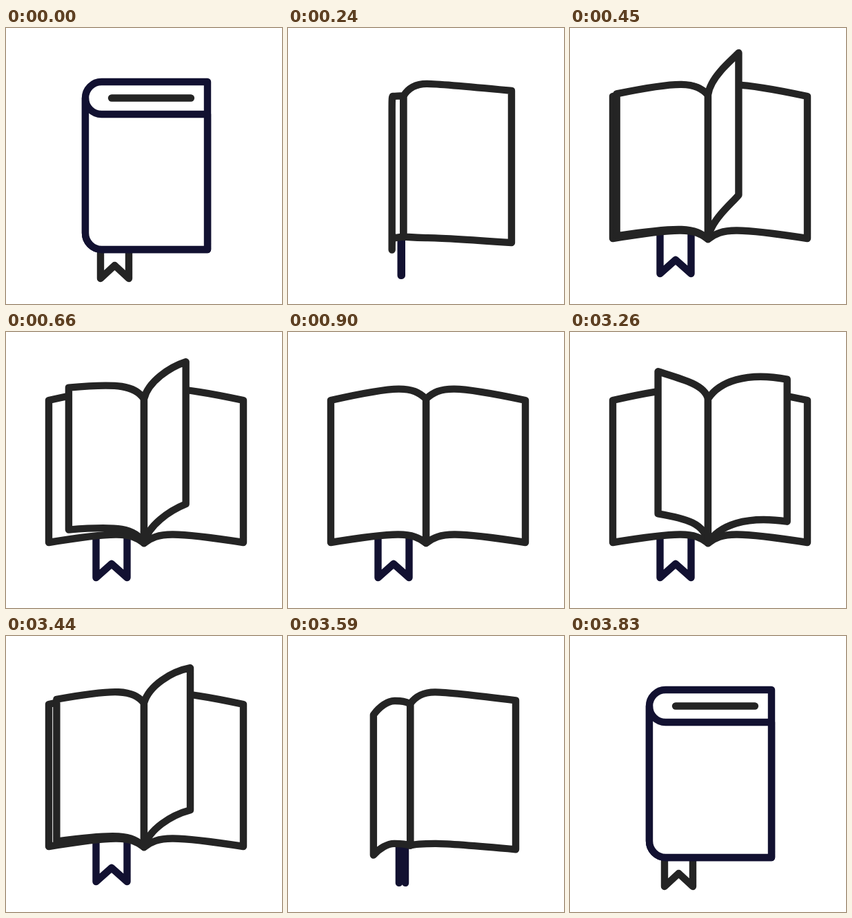
Write an HTML page with a canvas that moves like this. It is 400 px wide and 400 px high and loops after 4860 ms.

```html
<!DOCTYPE html>
<html lang="en">
<head>
<meta charset="utf-8">
<title>Book</title>
<style>
html, body { margin: 0; width: 100%; height: 100%; overflow: hidden; background: #fff; }
canvas { display: block; width: 100vmin; height: 100vmin; }
</style>
</head>
<body>
<canvas id="stage" width="400" height="400"></canvas>
<script>
const ctx = document.getElementById('stage').getContext('2d');
const GRAY = '#242424', NAVY = '#121131';
const LOOP = 4860, STEP = 30, OPENED = 900, CLOSE_AT = 2960;
const EDGE_ON = 0.438; // cover is seen edge-on

const clamp = (v, a = 0, b = 1) => Math.min(b, Math.max(a, v));
const lerp = (a, b, k) => a + (b - a) * k;
const smooth = v => { v = clamp(v); return v * v * (3 - 2 * v); };
const mix = (a, b, k) => a.map((v, i) => lerp(v, b[i], k));
const mixAll = (a, b, k) => a.map((pt, i) => mix(pt, b[i], k));

// One cubic as two joined cubics (7 points), so that it can morph to arc + line
function split(a, b, c, d) {
  const ab = mix(a, b, .5), bc = mix(b, c, .5), cd = mix(c, d, .5);
  const abc = mix(ab, bc, .5), bcd = mix(bc, cd, .5);
  return [a, ab, abc, mix(abc, bcd, .5), bcd, cd, d];
}

// Leaf poses while turning: edge x, edge y, two control points, their drop to the lower side
const POSES = [
  [344, 99, 221, 78, 240, 77, 212],
  [314, 68, 216, 72, 255, 57, 208],
  [245, 36, 203, 72, 232, 49, 208],
  [200, 38, 200, 75, 197, 55, 204],
  [128, 57, 196, 77, 168, 70, 200],
  [62, 99, 180, 78, 160, 77, 212]
];

// Open leaf whose outer edge stands at x
function leafAt(x) {
  let i = 0;
  while (i < POSES.length - 2 && x < POSES[i + 1][0]) i++;
  const a = POSES[i], b = POSES[i + 1];
  const [ex, ey, ax, ay, bx, by, drop] = mix(a, b, clamp((a[0] - x) / (a[0] - b[0])));
  return {
    top: split([200, 97], [ax, ay], [bx, by], [ex, ey]),
    low: split([200, 306], [ax, ay + drop], [bx, by + drop], [ex, ey + 206])
  };
}

// Edge of the closed book: quarter round at the spine, then straight
function closedEdge(from, to) {
  const k = (to - from) * .55;
  return [[115, from], [115, from + k], [125.5, to], [138.5, to], [155, to], [192, to], [292, to]];
}

const RIGHT = leafAt(344), LEFT = leafAt(62);
const BACK = { top: closedEdge(101.5, 78), low: closedEdge(297, 321) };
const COVER = { top: closedEdge(101.5, 125), low: closedEdge(297, 321) };

const morph = (a, b, k) => ({ top: mixAll(a.top, b.top, k), low: mixAll(a.low, b.low, k) });

function coverLeaf(p) {
  const leaf = morph(LEFT, COVER, p), sag = 11 * Math.sin(Math.PI * p);
  for (const side of [leaf.top, leaf.low]) {
    const [near, far] = [side[0][0], side[6][0]].sort((a, b) => a - b);
    for (const pt of side) pt[0] = clamp(pt[0], near, far);
    side[5][1] += sag / 2;
    side[6][1] += sag;
  }
  return leaf;
}

// Carry a turning page along with the leaf it belongs to
function carry(page, rest, now) {
  const move = s => page[s].map((pt, i) => pt.map((v, j) => v + now[s][i][j] - rest[s][i][j]));
  return { top: move('top'), low: move('low') };
}

function drawLeaf({ top, low }, color) {
  const r = [...low].reverse();
  ctx.beginPath();
  ctx.moveTo(...top[0]);
  ctx.bezierCurveTo(...top[1], ...top[2], ...top[3]);
  ctx.bezierCurveTo(...top[4], ...top[5], ...top[6]);
  ctx.lineTo(...r[0]);
  ctx.bezierCurveTo(...r[1], ...r[2], ...r[3]);
  ctx.bezierCurveTo(...r[4], ...r[5], ...r[6]);
  ctx.closePath();
  ctx.fillStyle = '#fff';
  ctx.fill();
  ctx.strokeStyle = color;
  ctx.stroke();
}

function drawLine(pts, color) {
  ctx.beginPath();
  pts.forEach(pt => ctx.lineTo(...pt));
  ctx.strokeStyle = color;
  ctx.stroke();
}

function drawRibbon(p) {
  const [a, b] = p < .27
    ? mix([130.5, 175.5], [161, 170], p / .27)
    : mix([161, 170], [178, 137], (p - .27) / .73);
  const y0 = lerp(297, 322, p), tip = lerp(356, 363, p), notch = lerp(336, 344, p);
  drawLine([[a, y0], [a, tip], [(a + b) / 2, notch], [b, tip], [b, y0]], a < b ? NAVY : GRAY);
}

// 1 = closed, 0 = open
const closedness = t => 1 - smooth((t - 30) / 364);
const turning = (t, start, length) => 344 - 282 * smooth((t - start) / length);

function draw(t) {
  const p = closedness(t), back = morph(RIGHT, BACK, p), cover = coverLeaf(p);
  const flipped = p > EDGE_ON, ink = flipped ? NAVY : GRAY;

  ctx.fillStyle = '#fff';
  ctx.fillRect(0, 0, 400, 400);
  ctx.lineWidth = 10.4;
  ctx.lineCap = ctx.lineJoin = 'round';

  drawRibbon(p);
  drawLeaf(back, ink);

  if (flipped) {
    const hinge = cover.top[0][0], edge = cover.top[6][0];
    const y = (back.top[3][1] + cover.top[3][1]) / 2;
    drawLine([[lerp(hinge, edge, .215), y], [lerp(hinge, edge, .864), y]], GRAY);
  }
  drawLeaf(cover, ink);

  // First page trails the cover
  const lag = Math.max(0, t - 270) / 2;
  const x = 62 + 230 * (closedness(t - lag) - p);
  if (x > 62.5) drawLeaf(carry(leafAt(x), LEFT, cover), GRAY);

  for (const [start, length] of [[240, 524], [525, 375]]) {
    const px = turning(t, start, length);
    if (!flipped && px < 341 && px > 62) drawLeaf(carry(leafAt(px), RIGHT, back), GRAY);
  }
}

const snap = v => Math.floor(v / STEP) * STEP;

function frame(now) {
  const t = now % LOOP;
  draw(t < CLOSE_AT ? Math.min(OPENED, snap(t)) : Math.max(0, OPENED - snap(t - CLOSE_AT)));
  requestAnimationFrame(() => frame(performance.now() - begin));
}

const begin = performance.now();
frame(0);
</script>
</body>
</html>
```
